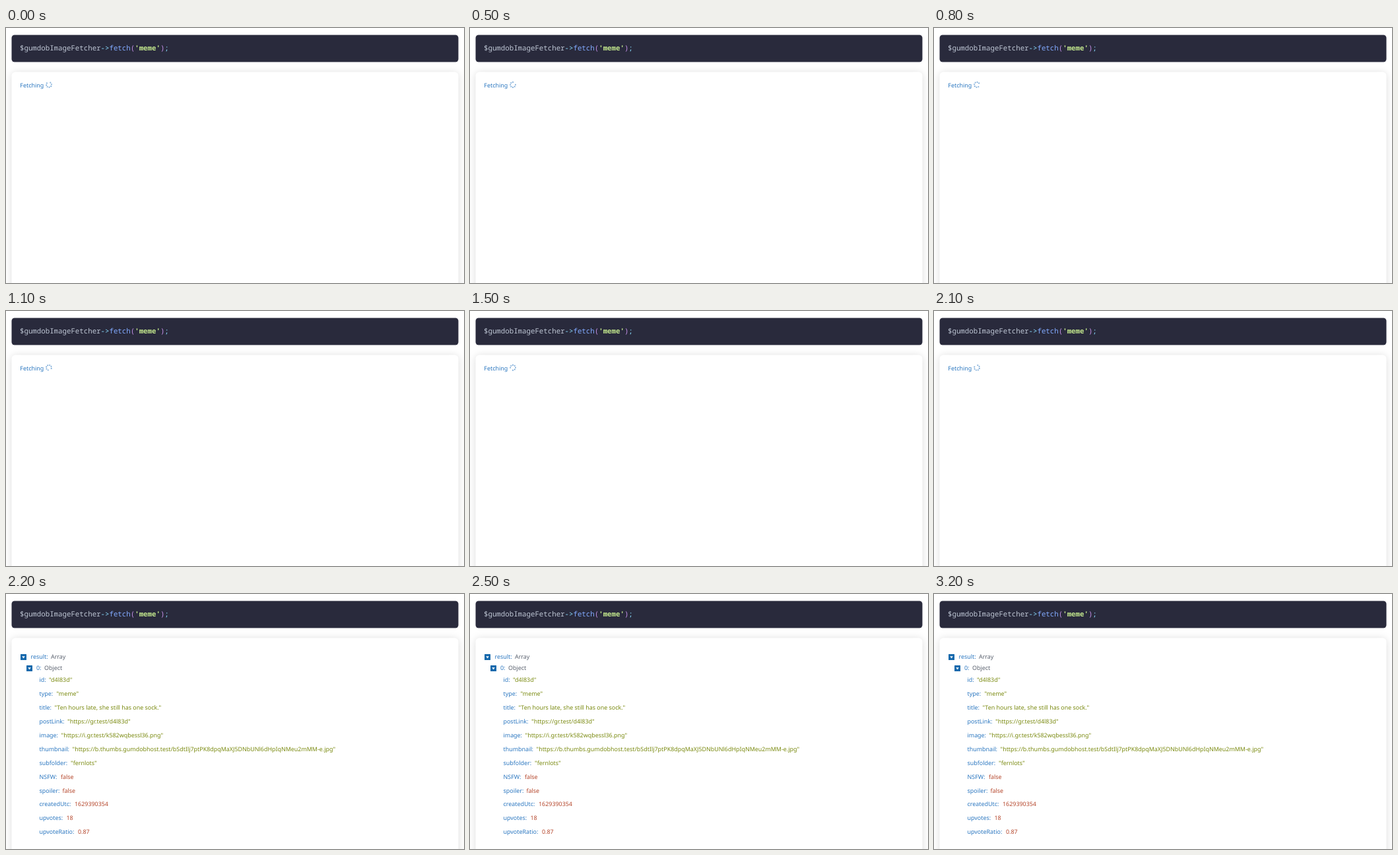
These frames come from a looping animation (694 by 386 pixels, 4 s). An HTML page:

```html
<!DOCTYPE html>
<html lang="en">
<head>
<meta charset="utf-8">
<title>Fetch demo</title>
<style>
  html, body { margin: 0; width: 100%; height: 100%; overflow: hidden; background: #fff; }
  svg { display: block; width: 694px; height: 386px; }
  text { font: 8.92px "Noto Sans", "Open Sans", sans-serif; text-rendering: geometricPrecision; white-space: pre; }

  .card { fill: #fff; filter: drop-shadow(0 1px 6px rgba(0, 0, 0, .14)); }
  .code { font: 10.76px "Noto Sans Mono", "DejaVu Sans Mono", monospace; fill: #bfc7d5; }
  .op { fill: #89ddff; }
  .fn { fill: #82aaff; }
  .paren { fill: #c792ea; }
  .quoted { fill: #c3e88d; font-weight: bold; }

  .key, .loading { fill: #2b77c0; }
  .kind { fill: #5c6370; }
  .str { fill: #7a8a10; }
  .num { fill: #b5472c; }
  .toggle rect { fill: #1669ac; }
  .toggle path { fill: #fff; }

  .loading { animation: hide 4s step-end infinite; }
  .result { animation: show 4s step-end infinite; }
  .spinner { animation: spin 4s step-end infinite; }

  @keyframes hide { 0% { visibility: visible; } 55%, 100% { visibility: hidden; } }
  @keyframes show { 0% { visibility: hidden; } 55%, 100% { visibility: visible; } }
  /* one 18 degree tick every 100 ms after a short hold */
  @keyframes spin {
    0% { transform: rotate(-54deg); }
    7.5% { transform: rotate(-36deg); animation-timing-function: steps(19, end); }
    55%, 100% { transform: rotate(306deg); }
  }
</style>
</head>
<body>
<svg viewBox="0 0 694 386">
  <defs>
    <g id="toggle" class="toggle">
      <rect width="9" height="9" rx=".5"/>
      <path d="M2.2 3.2h4.6L4.5 6.4z"/>
    </g>
  </defs>

  <rect x="8.5" y="10.5" width="677" height="41" rx="4.5" fill="#292a3c"/>
  <text class="code" x="21" y="34">$gumdobImageFetcher<tspan class="op">-&gt;</tspan><tspan class="fn">fetch</tspan><tspan class="paren">(</tspan><tspan class="quoted">'meme'</tspan><tspan class="paren">)</tspan><tspan class="op">;</tspan></text>

  <rect class="card" x="8.5" y="66.5" width="677" height="360" rx="6"/>

  <g class="loading">
    <text x="21.3" y="90">Fetching</text>
    <g transform="translate(65 85.8)">
      <g class="spinner" id="spinner"></g>
    </g>
  </g>

  <g class="result" id="result">
    <use href="#toggle" x="22" y="91"/>
    <text y="98"><tspan class="key" x="37.5">result:</tspan><tspan class="kind" x="68">Array</tspan></text>
    <use href="#toggle" x="31" y="108"/>
    <text y="115"><tspan class="key" x="46">0:</tspan><tspan class="kind" x="58">Object</tspan></text>
  </g>
</svg>
<script>
  const add = (parent, tag, attrs, text = '') => {
    const el = document.createElementNS('http://www.w3.org/2000/svg', tag);
    for (const name in attrs) el.setAttribute(name, attrs[name]);
    el.textContent = text;
    return parent.appendChild(el);
  };

  // ring of eight places with the upper right one left empty
  const spinner = document.getElementById('spinner');
  for (let i = 0; i < 7; i++) {
    const a = i * Math.PI / 4;
    add(spinner, 'circle', { cx: 3.9 * Math.cos(a), cy: 3.9 * Math.sin(a), r: .85 });
  }

  const fields = [
    ['id', 65, 'd4l83d'],
    ['type', 76.5, 'meme'],
    ['title', 73.5, "Ten hours late, she still has one sock."],
    ['postLink', 93, 'https://gr.test/d4l83d'],
    ['image', 83.5, 'https://i.gr.test/k582wqbessl36.png'],
    ['thumbnail', 100.5, 'https://b.thumbs.gumdobhost.test/bSdtIlj7ptPK8dpqMaXJ5DNbUNl6dHpIqNMeu2mMM-e.jpg'],
    ['subfolder', 98, 'fernlots'],
    ['NSFW', 83, false],
    ['spoiler', 85.5, false],
    ['createdUtc', 104, 1629390354],
    ['upvotes', 91.5, 18],
    ['upvoteRatio', 109, 0.87]
  ];
  const result = document.getElementById('result');
  fields.forEach(([key, x, value], i) => {
    const row = add(result, 'text', { y: 133.2 + 20.92 * i });
    add(row, 'tspan', { class: 'key', x: 50.5 }, key + ':');
    add(row, 'tspan', { class: typeof value === 'string' ? 'str' : 'num', x }, JSON.stringify(value));
  });
</script>
</body>
</html>
```
